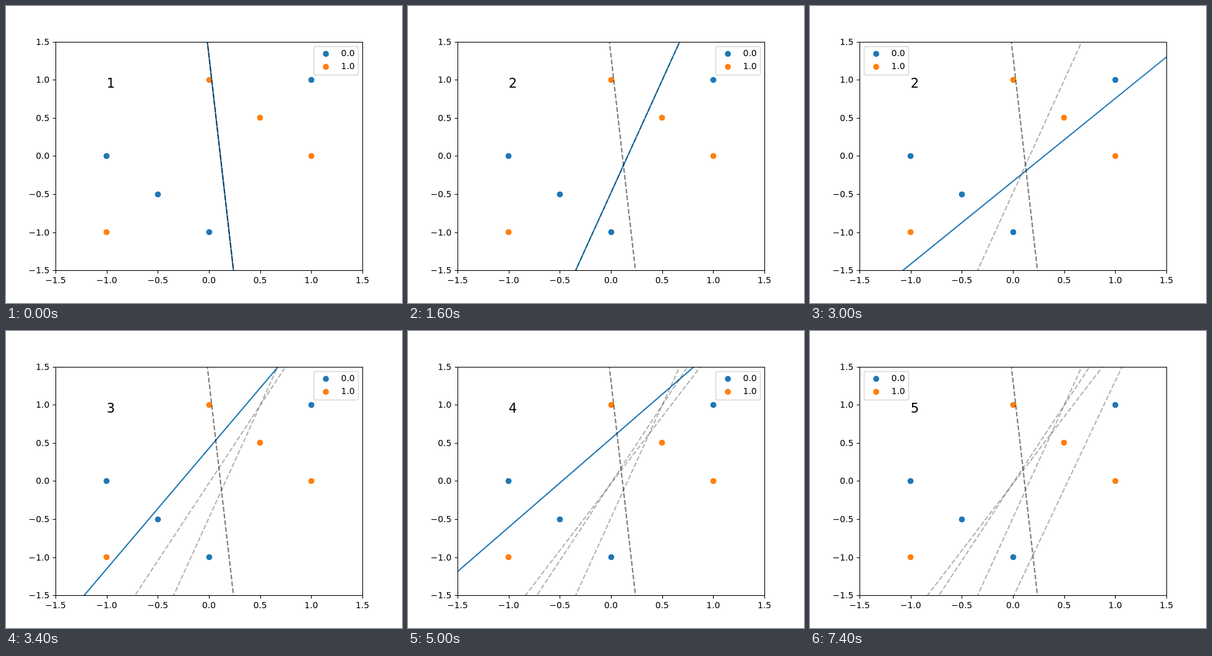
These frames come from a looping animation (640 by 480 pixels, 8 s). An HTML page with a canvas:

```html
<!DOCTYPE html>
<html lang="en">
<head>
<meta charset="utf-8">
<title>Perceptron training</title>
<style>
  html, body { margin: 0; width: 100%; height: 100%; overflow: hidden; background: #fff; }
  canvas { display: block; }
</style>
</head>
<body>
<canvas width="640" height="480"></canvas>
<script>
const ctx = document.querySelector('canvas').getContext('2d');
const BLUE = '#1f77b4', ORANGE = '#ff7f0e';
const STEP_MS = 200, STEPS = 40;
const TICKS = [-1.5, -1, -0.5, 0, 0.5, 1, 1.5];

// Training samples in visiting order: x, y, class
const samples = [
  [-1, 0, 0], [0, -1, 0], [-0.5, -0.5, 0], [-1, -1, 1],
  [1, 0, 1], [0, 1, 1], [0.5, 0.5, 1], [1, 1, 0]
];

const px = x => 328 + x * 496 / 3;
const py = y => 242.4 - y * 123.2;
const score = ([a, b, c], x, y) => a * x + b * y + c;

// Perceptron rule: class 0 belongs on the positive side of the line
const weights = [[9.47, 0.806, -1.06]];
for (let k = 0; k < STEPS - 1; k++) {
  const w = weights[k];
  const [x, y, label] = samples[k % samples.length];
  const sign = label ? -1 : 1;
  const wrong = score(w, x, y) * sign < 0;
  weights.push(wrong ? [w[0] + sign * x, w[1] + sign * y, w[2] + sign] : w);
}

function dot(x, y, color) {
  ctx.fillStyle = color;
  ctx.beginPath();
  ctx.arc(x, y, 4.86, 0, 2 * Math.PI);
  ctx.fill();
}

function text(str, x, y, align = 'left', size = 13.89) {
  ctx.font = `${size}px "DejaVu Sans", sans-serif`;
  ctx.textAlign = align;
  ctx.fillStyle = '#000';
  ctx.fillText(str, x, y);
}

// Line a*x + b*y + c = 0, drawn across the whole stage from left to right
function boundary([a, b, c], color, dash) {
  const ends = [-1.937, 1.976].map(y => [-(b * y + c) / a, y]).sort((p, q) => p[0] - q[0]);
  ctx.strokeStyle = color;
  ctx.lineWidth = 2.083;
  ctx.setLineDash(dash);
  ctx.beginPath();
  for (const [x, y] of ends) ctx.lineTo(px(x), py(y));
  ctx.stroke();
  ctx.setLineDash([]);
}

function axes() {
  ctx.strokeStyle = '#000';
  ctx.lineWidth = 1.11;
  ctx.strokeRect(80.5, 58.5, 496, 369);
  ctx.beginPath();
  for (const t of TICKS) {
    const x = Math.round(px(t)) + 0.5, y = Math.round(py(t)) + 0.5;
    ctx.moveTo(x, 427.5);
    ctx.lineTo(x, 432.4);
    ctx.moveTo(80.5, y);
    ctx.lineTo(75.6, y);
    const label = t.toFixed(1).replace('-', '\u2212');
    text(label, px(t), 448, 'center');
    text(label, 70.3, Math.round(py(t) + 5), 'right');
  }
  ctx.stroke();
}

function legend(left) {
  ctx.beginPath();
  ctx.roundRect(left + 0.5, 65.5, 72, 46, 2.8);
  ctx.fillStyle = 'rgba(255,255,255,0.8)';
  ctx.fill();
  ctx.strokeStyle = 'rgba(204,204,204,0.8)';
  ctx.lineWidth = 1.39;
  ctx.stroke();
  [['0.0', BLUE, 77], ['1.0', ORANGE, 98]].forEach(([label, color, y]) => {
    dot(left + 20, y + 0.4, color);
    text(label, left + 44.6, y + 4);
  });
}

// Does the line run through the upper right legend area?
const crossesLegend = w => score(w, 1.022, 1.44) * score(w, 1.464, 1.07) < 0;

function draw(step) {
  const epoch = Math.floor(step / 8);
  const current = weights[step];
  const history = [weights[0]];
  for (let e = 0; e <= epoch; e++) history.push(weights[e * 8]);

  ctx.fillStyle = '#fff';
  ctx.fillRect(0, 0, 640, 480);
  for (const [x, y, label] of samples) {
    dot(Math.floor(px(x)) + 0.5, Math.floor(py(y)) + 0.5, label ? ORANGE : BLUE);
  }

  ctx.save();
  ctx.beginPath();
  ctx.rect(80, 58, 496, 369);
  ctx.clip();
  boundary(current, BLUE, []);
  for (const w of history) boundary(w, 'rgba(0,0,0,0.3)', [7.71, 3.33]);
  ctx.restore();

  axes();
  text(epoch + 1, px(-1), 132, 'left', 20.83);
  legend([current, ...history].some(crossesLegend) ? 87 : 497);
}

function tick() {
  draw(Math.floor(performance.now() / STEP_MS) % STEPS);
  requestAnimationFrame(tick);
}
tick();
</script>
</body>
</html>
```
